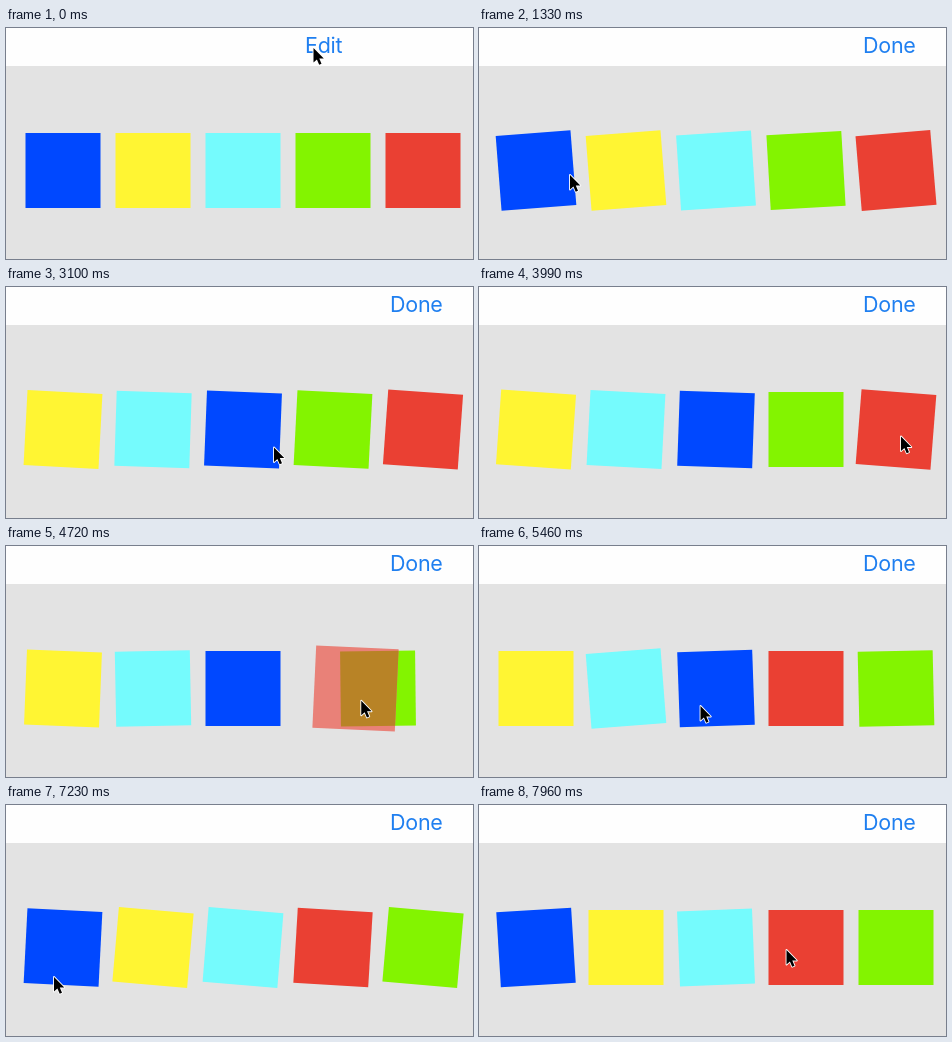
An HTML page with a canvas that plays this animation: 467 by 231 pixels, repeating every 8000 ms.

```html
<!DOCTYPE html>
<html lang="en">
<head>
<meta charset="utf-8">
<title>Reorder squares</title>
<style>
  html, body { margin: 0; width: 100%; height: 100%; overflow: hidden; background: #e3e3e3; }
  canvas, svg { position: absolute; left: 0; top: 0; width: 467px; height: 231px; }
  text { font: 400 21.5px Inter, Roboto, sans-serif; letter-spacing: -0.25px; fill: #1f7ff0; }
</style>
</head>
<body>
<canvas id="stage" width="467" height="231"></canvas>
<svg viewBox="0 0 467 231">
  <text id="edit" x="299" y="24.5">Edit</text>
  <text id="done" x="384" y="24.5">Done</text>
  <path id="cursor" d="M0 0V14.6L3.4 11.4L5.7 16.7L8 15.7L5.8 10.6H10.3Z"
        stroke="#fff" stroke-width="1.8" stroke-linejoin="round" paint-order="stroke"/>
</svg>
<script>
const LOOP = 8000, START = 740, STEP = 147.35;
const SIZE = 75, MID_Y = 142.5, SWING = 5;
const ctx = document.getElementById('stage').getContext('2d');
const [edit, done, cursor] = ['edit', 'done', 'cursor'].map(id => document.getElementById(id));

// All times below are in steps after the tap on Edit.
const poseTimes = [0, 4, 12, 22, 32, 40, 49];
const shapes = [
  { name: 'blue', color: '#0048ff', tilt: [0, -4.5, 0, 2, -2, -3.5, -3.5],
    track: [[8, 57], [12, 159.5], [15, 237], [36, 237], [40, 130.5], [42, 62], [44, 57]],
    lifts: [[8, 16], [36, 43]],
    ghost: '#6a80ee', over: { yellow: '#808080', cyan: '#1e8cff' } },
  { name: 'yellow', color: '#fff533', tilt: [0, -4.5, -3, 4, 0, 2, 0],
    track: [[11, 147], [12, 125], [13, 80], [14, 57], [41, 57], [43, 147]] },
  { name: 'cyan', color: '#75fbfd', tilt: [0, -3.8, 0, 3, -4.4, 0, -2.3],
    track: [[13, 237], [15, 147], [40, 147], [42, 237]] },
  { name: 'green', color: '#83f400', tilt: [0, -3.3, 0, 0, -1.3, 2.3, 0],
    track: [[26, 327], [28, 417]] },
  { name: 'red', color: '#ea4033', tilt: [0, -4.8, -4.8, 4.5, 0, -4.6, 0],
    track: [[24, 417], [28, 327]], lifts: [[24, 29]],
    ghost: '#e98178', over: { green: '#b88326' } }
];
const pointer = [
  [-2, 307.5, 20], [-1, 318, 22], [0, 318, 22], [2, 200, 100], [4, 91, 147], [8, 91, 147],
  [12, 187.5, 153], [15, 266, 156], [17, 270, 165], [19, 345, 177], [22, 422, 149.5],
  [24, 422, 151], [28, 333, 156], [31, 228, 161], [32, 221.5, 160], [36, 221.5, 160],
  [40, 86, 157], [42, 45, 162], [44, 48, 172], [46, 180, 178], [48, 298, 148], [49, 307.5, 145]
];

function track(keys, s, col = 1) {
  if (s <= keys[0][0]) return keys[0][col];
  for (let i = 1; i < keys.length; i++) {
    const a = keys[i - 1], b = keys[i];
    if (s <= b[0]) return a[col] + (b[col] - a[col]) * (s - a[0]) / (b[0] - a[0]);
  }
  return keys[keys.length - 1][col];
}

// A quick jiggle of about four swings a second, passing through the given tilts.
function jiggle(tilt, s) {
  if (s <= 0) return 0;
  let i = 1;
  while (i < poseTimes.length - 1 && s > poseTimes[i]) i++;
  const span = poseTimes[i] - poseTimes[i - 1];
  const turns = Math.round(span * STEP / 250);
  const from = Math.asin(tilt[i - 1] / SWING);
  const to = Math.asin(tilt[i] / SWING) + turns * 2 * Math.PI;
  const phase = from + (to - from) * (s - poseTimes[i - 1]) / span;
  return SWING * Math.sin(phase) * Math.PI / 180;
}

const isLifted = (shape, s) => (shape.lifts || []).some(([a, b]) => s >= a && s < b);

function outline(shape, s, lifted) {
  const x = track(shape.track, s), angle = jiggle(shape.tilt, s);
  const r = SIZE / 2 * (lifted ? 1.1 : 1);
  const c = r * Math.cos(angle), d = r * Math.sin(angle);
  const path = new Path2D();
  path.moveTo(x - c + d, MID_Y - d - c);
  path.lineTo(x + c + d, MID_Y + d - c);
  path.lineTo(x + c - d, MID_Y + d + c);
  path.lineTo(x - c - d, MID_Y - d + c);
  path.closePath();
  return path;
}

function fill(path, color) {
  ctx.fillStyle = color;
  ctx.fill(path);
}

function draw(s) {
  ctx.fillStyle = '#e3e3e3';
  ctx.fillRect(0, 0, 467, 231);
  ctx.fillStyle = '#fefefe';
  ctx.fillRect(0, 0, 467, 38);

  const held = shapes.find(shape => isLifted(shape, s));
  const resting = shapes.filter(shape => shape !== held)
    .map(shape => ({ shape, path: outline(shape, s) }));
  resting.forEach(({ shape, path }) => fill(path, shape.color));

  if (held) {
    const path = outline(held, s, true);
    fill(path, held.ghost);
    for (const other of resting) {
      const mix = held.over[other.shape.name];
      if (!mix) continue;
      ctx.save();
      ctx.clip(path);
      fill(other.path, mix);
      ctx.restore();
    }
  }

  edit.style.display = s < 0 ? '' : 'none';
  done.style.display = s < 0 ? 'none' : '';
  cursor.setAttribute('transform', `translate(${track(pointer, s)} ${track(pointer, s, 2)})`);
}

function stepAt(t) {
  if (t < 140) return -2;
  return t < START ? -1 : Math.floor((t - START) / STEP);
}

function tick() {
  draw(stepAt(performance.now() % LOOP));
  requestAnimationFrame(tick);
}
tick();
</script>
</body>
</html>
```
